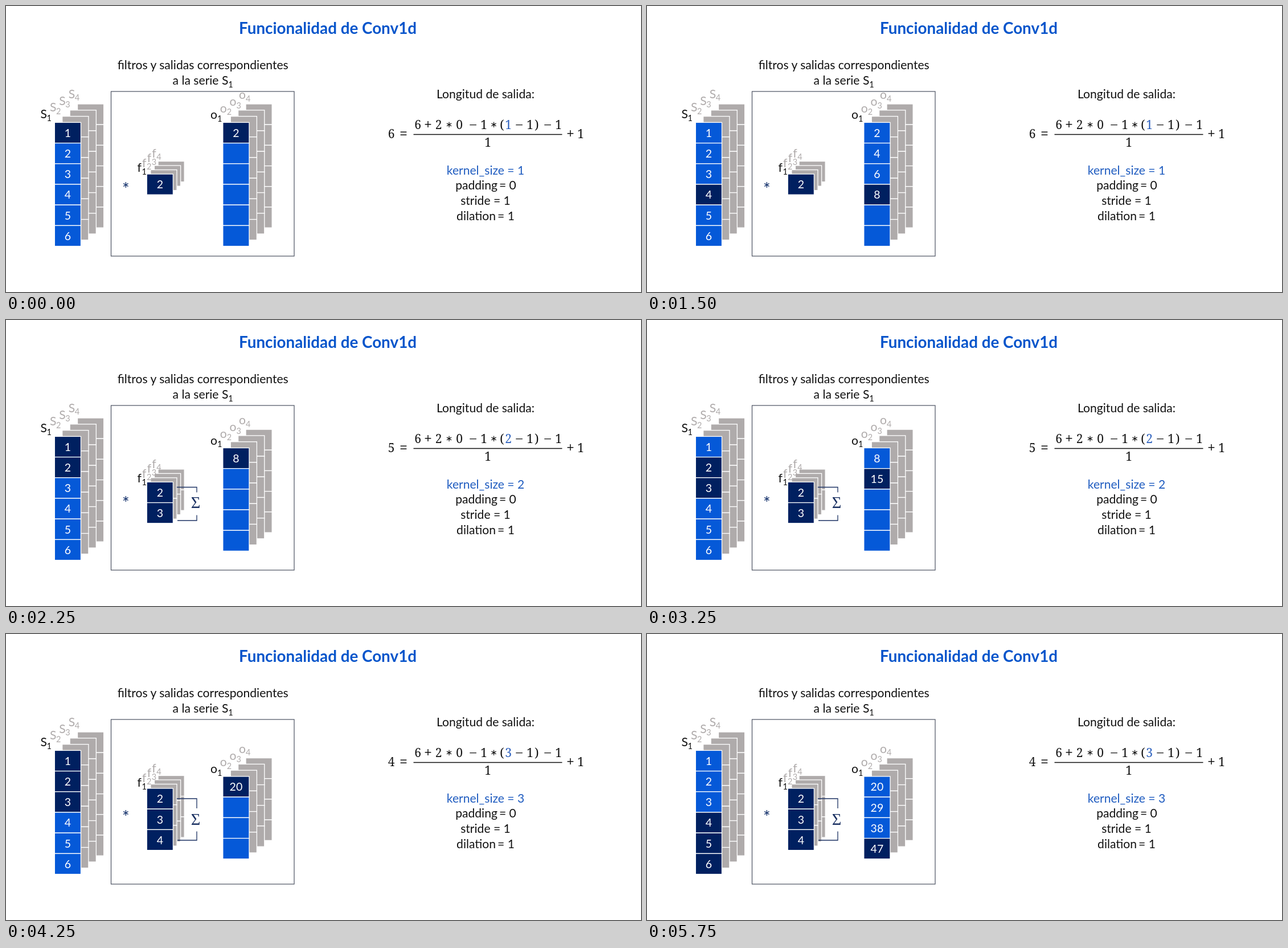
An HTML page for the animation above (6000 ms loop, 1115 px wide and 502 px high).

```html
<!DOCTYPE html>
<html lang="es">
<head>
<meta charset="utf-8">
<title>Funcionalidad de Conv1d</title>
<style>
  html, body { margin: 0; width: 100%; height: 100%; overflow: hidden; background: #fff; }
  svg { display: block; width: 1115px; height: 502px; }
  text { font: 21.1px Lato, sans-serif; fill: #111; white-space: pre; }
  .mid, .math, .num { text-anchor: middle; }
  .title { font-size: 27.8px; font-weight: 700; fill: #0755cb; }
  .num { font-size: 19.5px; fill: #fff; }
  .blue { fill: #1f5cc0; }
  .sub { font-size: 14.5px; }
  .math { font: 21px "Noto Serif", serif; }
  .math.blue { fill: #2b5fbd; }
  .math.op { font-size: 25px; }
  .math.ast { font: 15px "DejaVu Sans", sans-serif; }
  .sum { font: 28.5px "Liberation Serif", serif; fill: #1c3263; text-anchor: middle; }
</style>
</head>
<body>
<svg viewBox="0 0 1115 502">
  <text class="mid title" x="565" y="49">Funcionalidad de Conv1d</text>
  <text class="mid" x="345.7" y="111">filtros y salidas correspondientes</text>
  <text class="mid" x="345.7" y="138">a la serie S<tspan class="sub" dy="4.5">1</tspan></text>
  <rect x="184.5" y="150" width="321.5" height="289" fill="none" stroke="#4a5060" stroke-width="1.2"/>
  <text class="mid" x="210.5" y="332" style="font-size:30px;fill:#12306b">*</text>
  <text class="mid" x="842" y="162">Longitud de salida:</text>
  <path d="M715.5 225.5H976.5" stroke="#111" stroke-width="1.3"/>
  <text class="mid" x="842.5" y="322">padding<tspan dx="3">= 0</tspan></text>
  <text class="mid" x="842" y="349">stride = 1</text>
  <text class="mid" x="842" y="376">dilation<tspan dx="3">= 1</tspan></text>
  <g id="formula"></g>
  <g id="scene"></g>
</svg>
<script>
const BLUE = '#0559d8', NAVY = '#002060', GRAY = '#afabab';
const CELL = 46.2, PITCH = 36.2, FIRST_HOLD = 1000, STEP = 250, LOOP = 6000;
const series = [1, 2, 3, 4, 5, 6];

// Layout and results for each kernel size
const phases = [
  { start: 0, kernel: [2], out: [2, 4, 6, 8, 10, 12],
    filterY: 295, labelY: 291, outY: 204.4 },
  { start: 2250, kernel: [2, 3], out: [8, 15, 18, 23, 28],
    filterY: 284.4, labelY: 285, outY: 224.5, bracket: [293.5, 302.5, 342.5, 352], sumY: 330 },
  { start: 4250, kernel: [2, 3, 4], out: [20, 29, 38, 47],
    filterY: 271, labelY: 268, outY: 250, bracket: [289, 306, 346.5, 362], sumY: 334.5 }
];

const text = (x, y, s, cls) => `<text x="${x}" y="${y}" class="${cls}">${s}</text>`;

const cell = (x, y, fill) =>
  `<rect x="${x}" y="${y}" width="${CELL}" height="${PITCH}" fill="${fill}" stroke="#fff" stroke-width="1.3"/>`;

function label(letter, n, x, y, gap) {
  const fill = n === 1 ? '#111' : GRAY;
  return `<text x="${x}" y="${y}" style="fill:${fill}">${letter}` +
    `<tspan class="sub" x="${x + gap}" dy="4.5">${n}</tspan></text>`;
}

// Front column with three gray copies behind it
function stack({ x, y, dx, dy, values, active, name }) {
  let s = '';
  for (let layer = 3; layer >= 0; layer--) {
    values.forEach((v, i) => {
      const cy = y + i * PITCH;
      const fill = layer ? GRAY : active(i) ? NAVY : BLUE;
      s += cell(x + layer * dx, cy + layer * dy, fill);
      if (!layer) s += text(x + CELL / 2, cy + 25.3, v, 'num');
    });
  }
  for (let n = 4; n >= 1; n--) {
    s += label(name.letter, n, name.x + (n - 1) * name.dx, name.y + (n - 1) * name.dy, name.gap);
  }
  return s;
}

function drawScene(p, pos) {
  const size = p.kernel.length;
  let s = stack({
    x: 85.3, y: 204.4, dx: 13.4, dy: -10.8, values: series,
    active: i => i >= pos && i < pos + size,
    name: { letter: 'S', x: 60.5, y: 197, dx: 16.4, dy: -11.7, gap: 11 }
  });
  s += stack({
    x: 247.2, y: p.filterY, dx: 6.6, dy: -7.5, values: p.kernel,
    active: () => true,
    name: { letter: 'f', x: 230.5, y: p.labelY, dx: 8.6, dy: -8.5, gap: 8 }
  });
  s += stack({
    x: 380.8, y: p.outY, dx: 13.4, dy: -10.8,
    values: p.out.map((v, i) => i <= pos ? v : ''),
    active: i => i === pos,
    name: { letter: 'o', x: 359, y: p.outY - 6, dx: 16.7, dy: -11.7, gap: 12 }
  });
  if (p.bracket) {
    const [a, b, c, d] = p.bracket;
    s += `<path d="M300 ${a}H335V${b}M335 ${c}V${d}H301" fill="none" stroke="#1c3263" stroke-width="1.3"/>`;
    s += text(333, p.sumY, 'Σ', 'sum');
  }
  return s;
}

// Operators are set in their own sizes and centred on the math axis
function glyph(x, y, c) {
  if (c === '∗') return text(x, y - 3, c, 'math ast');
  if ('+−='.includes(c)) return text(x, y + 1.3, c, 'math op');
  return text(x, y, c, 'math');
}

function drawFormula(size) {
  const xs = [723, 741, 759.5, 778, 796, 820, 839, 856.5, 871, 901, 920, 932, 951, 970];
  const top = [...'6+2∗0−1∗(−1)−1'].map((c, i) => glyph(xs[i], 216, c));
  return top.join('') +
    text(882, 216, size, 'math blue') +
    glyph(676.5, 231.5, 7 - size) + glyph(698, 231.5, '=') +
    glyph(846, 247, 1) +
    glyph(991, 231.5, '+') + glyph(1009, 231.5, 1) +
    text(842, 296, `kernel_size = ${size}`, 'mid blue');
}

const scene = document.getElementById('scene');
const formula = document.getElementById('formula');
let shown = '';

function render(time) {
  const t = time % LOOP;
  const p = phases.findLast(q => t >= q.start);
  const pos = Math.max(0, Math.floor((t - p.start - FIRST_HOLD) / STEP) + 1);
  const key = p.start + ':' + pos;
  if (key === shown) return;
  shown = key;
  scene.innerHTML = drawScene(p, pos);
  formula.innerHTML = drawFormula(p.kernel.length);
}

const begin = performance.now();
function tick() {
  render(performance.now() - begin);
  requestAnimationFrame(tick);
}
tick();
</script>
</body>
</html>
```
